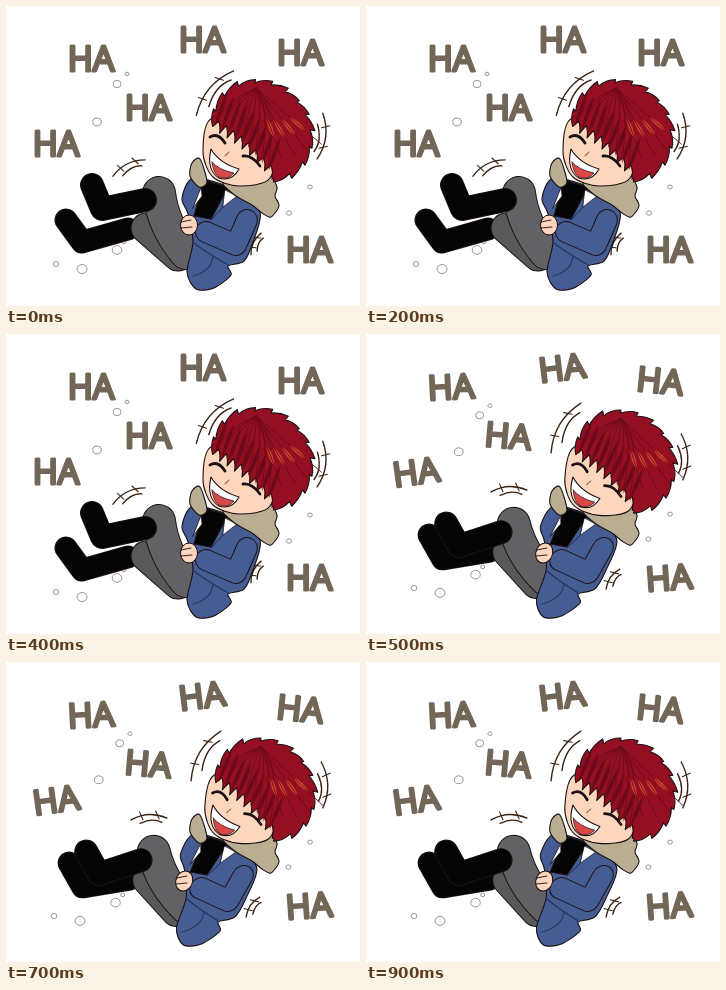
These frames come from a looping animation (354 by 300 pixels, 1000 ms). An HTML page:

```html
<!DOCTYPE html>
<html lang="en">
<head>
<meta charset="utf-8">
<title>Laughing</title>
<style>
html, body { margin: 0; width: 100%; height: 100%; overflow: hidden; background: #fff; }
svg { display: block; width: 100vw; height: 100vh; }
text { font: 400 34px "Open Sans", "Noto Sans", sans-serif; fill: #716657; stroke: #716657;
  stroke-width: 3; stroke-linejoin: round; text-anchor: middle; }
path { stroke-linejoin: round; stroke-linecap: round; }
</style>
</head>
<body>
<svg id="stage" viewBox="0 0 354 300"></svg>
<script>
const INK = '#1b1114', BROWN = '#3c2415', SKIN = '#fcd6bd', BLUE = '#465d93', NAVY = '#22345c';
const FUR = '#b9ad92', BOOT = '#040405', HAIR = '#940f21', SHADE = '#6d0a19', STREAK = '#cf4530';

function el(parent, tag, attrs) {
  const node = document.createElementNS('http://www.w3.org/2000/svg', tag);
  for (const key in attrs) node.setAttribute(key, attrs[key]);
  return parent.appendChild(node);
}

const group = (parent, transform = '') => el(parent, 'g', { transform });
const shape = (g, d, fill, stroke = INK, width = 1.1) =>
  el(g, 'path', { d, fill, stroke, 'stroke-width': width });
const line = (g, d, color = INK, width = 1.1) => shape(g, d, 'none', color, width);

// Thick round stroke with an ink edge
function limb(g, d, width, color) {
  line(g, d, INK, width + 2);
  line(g, d, color, width);
}

// Closed curve passing smoothly through "x,y x,y ..."
function blob(g, points, fill) {
  const p = points.split(' ').map(s => s.split(',').map(Number)), n = p.length;
  let d = 'M' + p[0];
  for (let i = 0; i < n; i++) {
    const [a, b, c, e] = [n - 1, 0, 1, 2].map(k => p[(i + k) % n]);
    d += 'C' + [b.map((v, k) => v + (c[k] - a[k]) / 7), c.map((v, k) => v - (e[k] - b[k]) / 7), c];
  }
  return shape(g, d + 'Z', fill);
}

// Leaf-shaped lock of hair between two points
function lock(g, x0, y0, x1, y1, bulge, color) {
  const mx = (x0 + x1) / 2, my = (y0 + y1) / 2, len = Math.hypot(x1 - x0, y1 - y0);
  const nx = (y0 - y1) / len * bulge, ny = (x1 - x0) / len * bulge;
  shape(g, `M${x0} ${y0}Q${mx + nx} ${my + ny} ${x1} ${y1}Q${mx - nx} ${my - ny} ${x0} ${y0}Z`, color, 'none');
}

const fringe = t => [206 + 60 * t, 120 + 50 * t - 5 * Math.sin(Math.PI * t)];

function hairOutline() {
  const tufts = 13, tips = 8;
  const rim = (t, lift) => {
    const a = -3.05 + 4.4 * t, r = 49 + lift + 3 * Math.sin(2 * a);
    return [256 + r * Math.cos(a), 125 + r * Math.sin(a)];
  };
  let d = 'M' + rim(0, 0);
  for (let i = 0; i < tufts; i++)
    d += 'Q' + [rim((i + .45) / tufts, 3), rim((i + 1) / tufts, 2 + i % 3)] + 'L' + rim((i + .94) / tufts, -1);
  for (let i = 0; i < tips; i++) {
    const [x, y] = fringe(1 - i / tips), [u, v] = fringe(1 - (i + .5) / tips);
    d += `L${x} ${y + 3}Q${u + 5} ${v} ${u + 3} ${v - 7}`;
  }
  return d + 'Z';
}

function drawHair(g) {
  shape(g, hairOutline(), HAIR);
  const crown = [250, 82], strands = 9;
  for (let i = 0; i < strands; i++) {
    const [x, y] = fringe((i + .5) / strands);
    lock(g, x + 12, y - 36, x, y - 2, 4, SHADE);
    line(g, `M${crown}Q${x + 8} ${crown[1] + 14} ${x} ${y - 5}`, SHADE, .9);
  }
  for (let i = 0; i < 4; i++) {
    const a = 1.22 - i * .17, near = 32 + 4 * i, far = near + 22;
    const at = r => [crown[0] + r * Math.cos(a), crown[1] + r * Math.sin(a)];
    lock(g, ...at(near), ...at(far), 4, STREAK);
    line(g, `M${crown}Q${at(near)} ${at(far + 20)}`, SHADE, .9);
  }
}

function drawHead(g) {
  blob(g, '207,112 197,146 207,171 233,180 264,172 268,130', SKIN);
  drawHair(g);
  line(g, 'M204 131Q212 126 219 137M237 150Q246 149 254 160', INK, 2.8);
  line(g, 'M223 146L219 150', '#a96550');
  shape(g, 'M205 143Q213 157 233 163Q226 176 213 172Q200 164 205 143Z', '#fff');
  shape(g, 'M206 156Q213 164 228 167Q221 175 213 171Q207 167 206 156Z', '#dc4848', INK, .7);
}

function drawFur(g) {
  blob(g, '194,153 186,157 184,170 193,181 201,176', FUR);
  blob(g, '217,177 242,177 262,168 271,181 269,190 273,200 265,211 256,207 246,199 230,190', FUR);
}

function drawLegs(g, swing) {
  const kick = turn => group(g, `rotate(${turn * swing} 175 235)`);
  const far = kick(6.5), near = kick(-6.5);
  limb(far, 'M122 223L76 236L60 214', 21, BOOT);
  limb(far, 'M140 222L172 250', 29, '#59595c');
  limb(near, 'M153 187Q157 220 180 247', 32, '#626265');
  limb(near, 'M139 194L96 203L86 179', 22, BOOT);
}

function drawCoat(g) {
  blob(g, '188,172 230,184 254,206 247,236 238,255 222,260 225,269 208,282 190,283 181,266 187,236 182,208 176,192', BLUE);
  shape(g, 'M198 174L222 181L205 213L188 210Z', BOOT);
  shape(g, 'M219 184L231 190L217 201Z M195 182L196 190L187 202Z', '#fff', INK, .7);
  line(g, 'M217 201L205 214M187 236Q196 244 222 259M207 250Q206 265 187 270M236 207L228 226', NAVY);
  limb(g, 'M241 214L230 239L200 226', 20, BLUE);
  el(g, 'ellipse', { cx: 183, cy: 219, rx: 8.5, ry: 10, fill: SKIN, stroke: INK });
  line(g, 'M175 216L185 214M175 222L186 221', INK, .9);
}

// Centre, angle, length, then the shift and turn of the second pose
const swooshes = [
  [209, 87, -50, 58, -9, 7, -9],
  [123, 162, -27, 36, 20, -5, 24],
  [314, 130, 97, 46, 2, -7, -9],
  [250, 238, -65, 24, -3, 7, 10]
];

function drawSwoosh(g, [x, y, angle, len, dx, dy, turn], swing) {
  const s = group(g, `translate(${x + dx * swing} ${y + dy * swing}) rotate(${angle + turn * swing})`);
  const h = len / 2, bow = len / 4;
  line(s, `M${-h} 0Q0 ${-bow} ${h} 0M${-h * .5} 4Q${h * .2} ${4 - bow * .6} ${h * .7} 4`, BROWN, 1.4);
  for (const side of [-.45, .45]) line(s, `M${h * side - 1} ${-bow * .4 - 4}l3 8`, BROWN);
}

// Centre and tilt in the second pose
const words = [[85, 53, -3], [196, 34, -7], [294, 47, 6], [142, 102, 5], [50, 138, -8], [303, 244, -4]];

const bubbles = [[121, 68, 2], [111, 78, 4], [91, 116, 4.3], [304, 181, 2.3], [283, 207, 2.5],
  [118, 236, 2], [111, 244, 4.8], [76, 263, 5], [50, 258, 2.8]];

function drawPose(swing) {
  const g = group(stage);
  for (const [x, y, tilt] of words)
    el(g, 'text', { transform: `translate(${x} ${y}) rotate(${tilt * swing})`, y: 12 }).textContent = 'HA';
  // Bubbles drift towards the middle height
  for (const [x, y, r] of bubbles)
    el(g, 'ellipse', {
      cx: x + swing * (185 - y) / 40, cy: y + swing * (160 - y) / 25,
      rx: r, ry: r * .9, fill: '#fff', stroke: '#978980', 'stroke-width': .9
    });
  for (const s of swooshes) drawSwoosh(g, s, swing);
  drawLegs(g, swing);
  drawCoat(group(g, `translate(0 180) skewX(${-7 * swing}) translate(0 -180)`));
  drawFur(g);
  drawHead(group(g, `translate(0 ${swing}) rotate(${3 * swing} 225 180)`));
  return g;
}

const stage = document.getElementById('stage');
const poses = [0, 1].map(drawPose);

function render(ms) {
  const active = Math.floor((ms % 1000) / 100) % 2;
  poses.forEach((g, i) => g.setAttribute('display', i === active ? 'inline' : 'none'));
}

const start = performance.now();
function tick() {
  render(performance.now() - start);
  requestAnimationFrame(tick);
}
tick();
</script>
</body>
</html>
```
